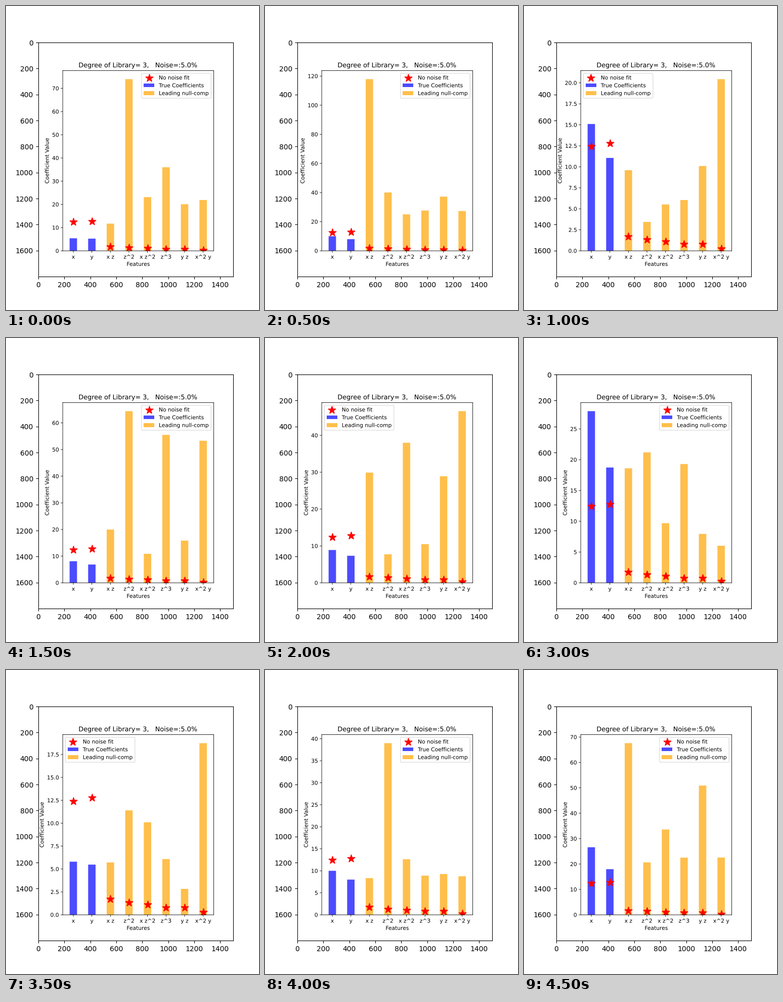
Recreate the animation shown at these times as a matplotlib script. Size 500 by 600 pixels, loop 5000 ms.

```python
import matplotlib.pyplot as plt
import numpy as np
from matplotlib.animation import FuncAnimation
from matplotlib.patheffects import Normal
from matplotlib.text import Text

DPI = 100
K = 0.77                # scale of the nested chart relative to its outer axes
PX = 385 / 1500         # stage pixels per unit of the outer axes

FEATURES = ["x", "y", "x z", "z^2", "x z^2", "z^3", "y z", "x^2 y"]
STARS = [12.42, 12.8, 1.73, 1.34, 1.11, 0.79, 0.79, 0.26]

# Only the outstanding bars of each trial; bar_heights fills in the others.
TRIALS = [
    {"x": 5.4, "z^2": 73.95, "z^3": 36},
    {"x z": 117.9},
    {"x": 15.1, "x z": 9.6, "y z": 10.1, "x^2 y": 20.44},
    {"x": 8.1, "z^2": 64.4, "z^3": 55.5, "x^2 y": 53.3},
    {"x": 8.9, "x z": 29.9, "x z^2": 38, "y z": 28.9, "x^2 y": 46.57},
    {"z^2": 58.1},
    {"x": 27.89, "x z": 18.6, "z^2": 21.2, "z^3": 19.3},
    {"x": 5.8, "z^2": 11.4, "x z^2": 10.1, "x^2 y": 18.74},
    {"z^2": 39},
    {"x": 26.6, "x z": 67.6, "x z^2": 33.6, "y z": 50.9},
]

fig = plt.figure(figsize=(5, 6), dpi=DPI)

outer = fig.add_subplot()
outer.set_aspect("equal")
outer.set(xlim=(-0.5, 1499.5), ylim=(1799.5, -0.5),
          xticks=range(0, 1500, 200), yticks=range(0, 1800, 200))

# The nested chart starts on a whole pixel.
left, bottom = 64 + 187.5 * PX, 66 + 198 * PX
width, height = 1162.5 * PX, 1386 * PX
ax = fig.add_axes([left / 500, bottom / 600, width / 500, height / 600])


def bar_heights(i):
    """y follows x; unlisted bars get a small random share of the peak."""
    trial = TRIALS[i]
    x = trial.get("x", 10)
    rng = np.random.default_rng(i)
    heights = max(trial.values()) * rng.uniform(0.15, 0.35, len(FEATURES))
    heights[:2] = x, 0.6 * x + 2
    for name, value in trial.items():
        heights[FEATURES.index(name)] = value
    return heights


def tick_marks(values, axis):
    """Draw unsnapped tick marks hanging outside the axes."""
    size = 3.5 * K * DPI / 72
    pos = np.repeat(values, 3)
    side = np.tile([0, -size / (height if axis == "x" else width), np.nan],
                   len(values))
    style = dict(color="black", lw=0.8 * K, clip_on=False, snap=False,
                 solid_capstyle="butt")
    if axis == "x":
        ax.plot(pos, side, transform=ax.get_xaxis_transform(), **style)
    else:
        ax.plot(side, pos, transform=ax.get_yaxis_transform(), **style)


def update(i):
    values = bar_heights(i)
    xs = np.arange(len(values))
    top = values.max() * 1.05

    ax.clear()
    bar = dict(width=0.4, alpha=0.7, snap=False)
    ax.bar(xs[:2], values[:2], color="blue", label="True Coefficients", **bar)
    ax.bar(xs[2:], values[2:], color="orange", label="Leading null-comp", **bar)
    ax.scatter(xs, STARS, s=200 * K**2, lw=1.5 * K, marker="*", color="red",
               label="No noise fit")

    ax.set_ylim(0, top)
    ticks = [t for t in ax.get_yticks() if 0 <= t <= top]
    ax.set_yticks(ticks)
    ax.set_xticks(xs, FEATURES)
    tick_marks(xs, "x")
    tick_marks(ticks, "y")
    ax.set(xlim=(-0.57, 7.57), ylim=(0, top))
    ax.tick_params(length=0, pad=7 * K, labelsize=10 * K)

    ax.set_title("Degree of Library= 3,   Noise=:5.0%",
                 fontsize=12 * K, pad=6 * K)
    ax.set_xlabel("Features", fontsize=10 * K, labelpad=4 * K)
    ax.set_ylabel("Coefficient Value", fontsize=10 * K, labelpad=4 * K)
    frame = ax.legend(loc="best", fontsize=10 * K).get_frame()
    frame.set(linewidth=K, snap=False)
    for spine in ax.spines.values():
        spine.set(linewidth=0.8 * K, snap=False)

    # Draw text as outlines so that small type is not hinted.
    for text in ax.findobj(Text):
        text.set_path_effects([Normal()])
    return []


anim = FuncAnimation(fig, update, frames=len(TRIALS), interval=500,
                     repeat=True, repeat_delay=0)
plt.show()
```
